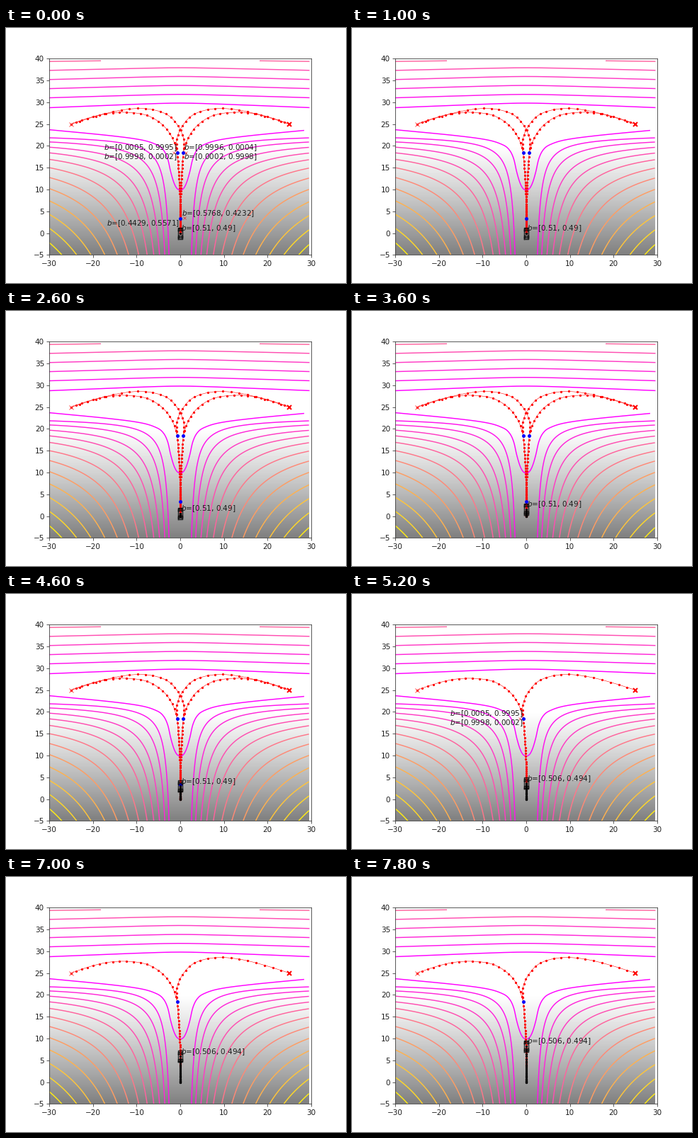
A matplotlib script for the animation above (8000 ms loop, 480 by 360 pixels).

```python
import numpy as np
import matplotlib.pyplot as plt
from matplotlib.animation import FuncAnimation

STEP_MS = 200
FRAMES = 40
REPLAN = 26          # second planning pause, five ticks long
NODE_Y = 18.4
SPLIT_Y = 3.3
INK = "#1c1c1c"

plt.rcParams.update({"axes.edgecolor": "#3a3a3a", "xtick.color": "#3a3a3a",
                     "ytick.color": "#3a3a3a", "xtick.labelcolor": INK,
                     "ytick.labelcolor": INK, "text.color": INK})
fig, ax = plt.subplots(figsize=(6.4, 4.8), dpi=75)
spring = plt.get_cmap("spring")


def spline(points, n):
    """Catmull-Rom curve with n samples per segment."""
    p = np.array(points, float)
    p = np.vstack([2 * p[0] - p[1], p, 2 * p[-1] - p[-2]])
    t = np.arange(n)[:, None] / n
    parts = []
    for a, b, c, d in zip(p, p[1:], p[2:], p[3:]):
        parts.append(b + 0.5 * t * (c - a + t * (2 * a - 5 * b + 4 * c - d
                                                 + t * (3 * (b - c) + d - a))))
    return np.vstack(parts + [p[-2:-1]])


def level_color(k):
    return spring(0.077 * k)


def draw_background():
    depth = np.clip((20 - np.linspace(-5, 40, 181)) / 25, 0, 1)
    ax.imshow(1 - 0.5 * depth[:, None] ** 1.15, cmap="gray", vmin=0, vmax=1,
              origin="lower", extent=(-30, 29.5, -5, 40),
              interpolation="bilinear", zorder=0)


def draw_contours():
    # upper family: almost flat lines with a rounded crest
    x = np.linspace(-30, 29.5, 240)
    crest = [29.8, 31.8, 33.85, 35.9, 37.9, 39.68]
    drop = [1.05, 0.78, 0.73, 0.7, 0.6, 0.33]
    ridge = (np.hypot(x, 5) - 5) / (np.hypot(30, 5) - 5)
    for k, (c, d) in enumerate(zip(crest, drop)):
        y = c - d * ridge
        ax.plot(x, np.where(y <= 39.5, y, np.nan), color=level_color(k),
                lw=1.4, zorder=1)

    # valley line that closes on the axis of symmetry
    half = spline([(-30, 23.7), (-16.6, 22.4), (-9.1, 21.4), (-5.5, 20.3),
                   (-3.9, 19.1), (-2.9, 17.1), (-2.2, 14.1), (-1.5, 11.7),
                   (-0.8, 10.3), (0, 9.75)], 8)
    for side in (1, -1):
        keep = side * half[:, 0] <= 29.5
        ax.plot(side * half[keep, 0], half[keep, 1], color=level_color(0),
                lw=1.4, zorder=1)

    # lower family: soft minimum of the distances to both corridors
    def cost(gx, gy):
        return -np.abs(gx) ** -0.4 - (24.4 - gy) ** -0.4

    left_y = np.array([21.85, 20.9, 19.7, 18.4, 16.9, 15, 12.75,
                       10.2, 7.4, 4.3, 1.1, -2.2])
    for side in (-1, 1):
        gx, gy = np.meshgrid(side * np.linspace(0.5, 30 if side < 0 else 29.5, 120),
                             np.linspace(-5, 24, 120))
        ax.contour(gx, gy, cost(gx, gy), levels=cost(30, left_y),
                   colors=[level_color(k + 1) for k in range(len(left_y))],
                   linewidths=1.4, zorder=1)


def car_y(m):
    m = np.asarray(m, float)
    late = np.maximum(m - 22, 0)
    return np.where(m <= 22, 0.0082 * m ** 2,
                    3.97 + 0.42 * late + 0.0145 * late ** 2)


def steps_done(frame):
    """Moves made by the car, which rests while a plan is shown."""
    if frame < REPLAN:
        return max(0, min(frame - 4, 21))
    return 21 + max(0, frame - REPLAN - 4)


def trunk(start, side):
    u = np.linspace(0, 1, 25)
    s = 0.5 * u + 0.5 * u ** 2
    return np.c_[side * 0.7 * s ** 2, start + (NODE_Y - start) * s]


NEAR = spline([(-0.7, 18.4), (-1.8, 21.8), (-4, 24.8), (-7.6, 27), (-12.3, 27.7),
               (-17, 27.4), (-21.3, 26.3), (-25, 25)], 3)
FAR = spline([(-0.7, 18.4), (-0.8, 21.5), (0.5, 24.6), (3.2, 27.3), (8, 28.55),
              (13.5, 28.2), (19.3, 26.8), (25, 25)], 3)


def chain(path, color, zorder):
    return ax.plot(path[:, 0], path[:, 1], color=color, lw=0.5, marker=".",
                   ms=6.2, mew=0, zorder=zorder)[0]


def branch(start, side):
    flip = np.array([-side, 1])
    return [chain(p, "red", 3) for p in (trunk(start, side), NEAR * flip, FAR * flip)]


def dots(points):
    return ax.plot(*zip(*points), "o", color="blue", ms=4.8, mew=0, zorder=4)[0]


def crosses(points):
    return ax.plot(*zip(*points), "x", color="red", ms=4.5, mew=0.5, zorder=4)[0]


def label(x, y, values, ha="left"):
    return ax.text(x, y, f"$b$=[{values}]", ha=ha, va="center", zorder=6)


def rect(cx, cy, w, h):
    x = cx + w / 2 * np.array([-1, 1, 1, -1, -1])
    y = cy + h / 2 * np.array([-1, -1, 1, 1, -1])
    return np.c_[x, y]


CAR = [rect(0, 0, 1, 2.6)] + [rect(x, y, 0.24, 0.5)
                              for x in (-0.36, 0.36) for y in (-0.8, 0.8)]

draw_background()
draw_contours()
ax.plot(-25, 25, "x", color="red", ms=6, mew=0.6, zorder=3)
ax.plot(25, 25, "x", color="red", ms=6, mew=1.9, zorder=3)

root = np.c_[np.zeros(21), car_y(np.arange(21))]
first_plan = [chain(root, "red", 3), *branch(SPLIT_Y, -1), *branch(SPLIT_Y, 1),
              dots([(-0.7, NODE_Y), (0.7, NODE_Y), (0, SPLIT_Y)])]
second_plan = [*branch(car_y(21), -1), dots([(-0.7, NODE_Y)])]

left_labels = [label(-0.75, 19.6, "0.0005, 0.9995", "right"),
               label(-0.75, 17.4, "0.9998, 0.0002", "right"),
               crosses([(-1.4, 18.5)])]
other_labels = [label(0.75, 19.6, "0.9996, 0.0004"),
                label(0.75, 17.4, "0.0002, 0.9998"),
                label(0.25, 4.5, "0.5768, 0.4232"),
                label(-0.25, 2.2, "0.4429, 0.5571", "right"),
                crosses([(1.3, 18.4), (1, 3.5)])]

track = chain(np.zeros((1, 2)), "black", 5)
body = [ax.plot([], [], color="black", lw=1.4, alpha=0.8, zorder=5)[0] for _ in CAR]
car_label = label(0.2, 1, "0.51, 0.49")

ax.set_aspect("equal")
ax.set_xlim(-30, 30)
ax.set_ylim(-5, 40)
ax.set_xticks(range(-30, 31, 10))
ax.set_yticks(range(-5, 41, 5))


def show(artists, on):
    for a in artists:
        a.set_visible(on)


def update(frame):
    m = steps_done(frame)
    y = float(car_y(m))
    late = frame >= REPLAN
    show(first_plan, not late)
    show(second_plan, late)
    show(left_labels, frame < 5 or REPLAN <= frame < REPLAN + 5)
    show(other_labels, frame < 5)
    track.set_data(np.zeros(m + 1), car_y(np.arange(m + 1)))
    for line, part in zip(body, CAR):
        line.set_data(part[:, 0], part[:, 1] + y)
    car_label.set_y(y + 1)
    car_label.set_text("$b$=[0.506, 0.494]" if late else "$b$=[0.51, 0.49]")
    return []


anim = FuncAnimation(fig, update, frames=FRAMES, interval=STEP_MS,
                     init_func=lambda: update(0), repeat=True, repeat_delay=0)
plt.show()
```
